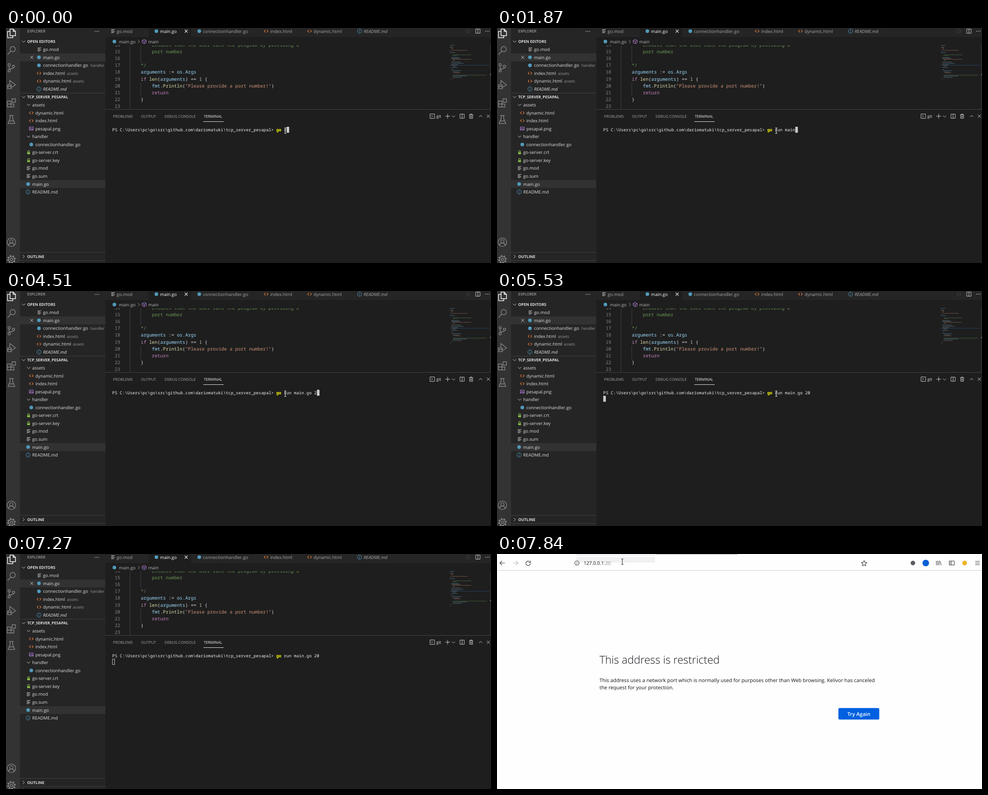
An HTML page for the animation above (8 s loop, 1074 by 521 pixels).

```html
<!DOCTYPE html>
<html lang="en">
<head>
<meta charset="utf-8">
<title>Run a TCP server</title>
<style>
html, body { margin: 0; width: 100%; height: 100%; overflow: hidden; background: #1e1e1e; }
svg { display: block; width: 100%; height: 100%; }
text { font-family: "Open Sans", "Noto Sans", sans-serif; white-space: pre; text-rendering: geometricPrecision; }
.mono { font-family: "Noto Sans Mono", "DejaVu Sans Mono", monospace; font-weight: 500; }
</style>
</head>
<body>
<svg id="stage" viewBox="0 0 1074 521" xmlns="http://www.w3.org/2000/svg"></svg>
<script>
const LOOP = 8000;
const TERM = { x: 235.3, y: 229, step: 5.595, size: 9.325 };
const CODE_SIZE = 10.25;
const PROMPT = String.raw`PS C:\Users\pc\go\src\github.com\dariomatuki\tcp_server_pesapal> `;
const COMMAND = 'go run main.go 20';

const SHAPES = {
  lines: 'M-4-3.5h8M-4-1.2h5.5M-4 1.2h8M-4 3.5h5.5',
  html: 'M-1.4-2.8L-4.2 0L-1.4 2.8M1.4-2.8L4.2 0L1.4 2.8',
  info: 'M-4.7 0a4.7 4.7 0 1 0 9.4 0a4.7 4.7 0 1 0-9.4 0M0-2.6v1.2M0-.4v3.2',
  lock: 'M-2-.5v-1.4a2 2 0 0 1 4 0v1.4M-3.1 .5h6.2M-3.1 1.5h6.2M-3.1 2.5h6.2M-3.1 3.5h6.2',
  image: 'M-4.2-3.4h8.4v6.8h-8.4zM-4 2.4l3-3 2 2 1-1 2 2',
  close: 'M-3.3-3.3L3.3 3.3M3.3-3.3L-3.3 3.3',
  down: 'M-3.6-1.8L0 1.8L3.6-1.8',
  up: 'M-3.6 1.8L0-1.8L3.6 1.8',
  right: 'M-1.8-3.6L1.8 0L-1.8 3.6',
  cube: 'M0-4.8L4.5-2.5v5L0 4.8L-4.5 2.5v-5zM-4.5-2.5L0 0L4.5-2.5M0 0v4.8',
  split: 'M-4.8-4.6h9.6v9.2h-9.6zM0-4.6v9.2',
  dots: 'M-4.5 0h1.6M-.8 0h1.6M2.9 0h1.6',
  plus: 'M-5.2 0h10.4M0-5.2v10.4',
  trash: 'M-4.4-3.2h8.8M-1.6-3.2v-1.6h3.2v1.6M-3.2-3.2v8h6.4v-8M-1-1v4M1-1v4',
  shell: 'M-5-5h10v10h-10zM-2-2.4L.6 0L-2 2.4',
  compare: 'M-3-4v6a2 2 0 0 0 2 2h2M3 4v-6a2 2 0 0 0-2-2h-2',
  files: 'M-3-9.5h7l5 5v9.5h-12zM-3-4.5h-5.5v14h11.5v-4.5M4-9.5v5h5',
  search: 'M-3-3.2a5.8 5.8 0 1 0 11.6 0a5.8 5.8 0 1 0-11.6 0M-1.3 1L-8.5 9',
  branch: 'M-7.5-6.5a2.6 2.6 0 1 0 5.2 0a2.6 2.6 0 1 0-5.2 0M-7.5 6.7a2.6 2.6 0 1 0 5.2 0a2.6 2.6 0 1 0-5.2 0M2-3a2.6 2.6 0 1 0 5.2 0a2.6 2.6 0 1 0-5.2 0M-4.9-3.9v8M4.6-.4c0 4-7 1.5-9 4',
  debug: 'M-3.5-2v-7.5L9 0L1 5.5M-8 2.5a3.6 3.6 0 0 1 7.2 0v2.8a3.6 3.6 0 0 1-7.2 0zM-8 3h7.2M-9.8 0l2 1.4M1-0l-2 1.4M-10 4.5h2M-.8 4.5h2M-9.8 9l2-1.6M1 9l-2-1.6',
  blocks: 'M-9-4h8v13h-8zM-9 2.5h14.5v6.5h-14.5M-1 2.5v6.5M1.5-9h7.5v7.5h-7.5z',
  beaker: 'M-4.5-9h9M-2.7-9v6.5L-7.5 8.5h15L2.7-2.5V-9M-5 3h10',
  account: 'M-9.4 0a9.4 9.4 0 1 0 18.8 0a9.4 9.4 0 1 0-18.8 0M-3.6-2a3.6 3.6 0 1 0 7.2 0a3.6 3.6 0 1 0-7.2 0M-6.2 7c1-7 11.4-7 12.4 0',
  hub: 'M-2.6 0a2.6 2.6 0 1 0 5.2 0a2.6 2.6 0 1 0-5.2 0M-6.4 0a6.4 6.4 0 1 0 12.8 0a6.4 6.4 0 1 0-12.8 0',
  teeth: 'M-8.2 0a8.2 8.2 0 1 0 16.4 0a8.2 8.2 0 1 0-16.4 0',
  back: 'M5.5 0h-11M-1-4.5L-5.5 0L-1 4.5',
  forward: 'M-5.5 0h11M1-4.5L5.5 0L1 4.5',
  reload: 'M3.6-3.4a5 5 0 1 0 1.4 3.4M5-5.6v4h-4',
  star: 'M0-6l1.8 3.9 4.2.5-3.1 2.9.8 4.2-3.7-2.1-3.7 2.1.8-4.2-3.1-2.9 4.2-.5z',
  books: 'M-5-5v10M-2-5v10M1-5v10M3-4.6l2.6 9.4',
  sidebar: 'M-5.5-4.5h11v9h-11zM-1-4.5v9M-4-2h1.6M-4 0h1.6M-4 2h1.6',
  menu: 'M-5-3.8h10M-5 0h10M-5 3.8h10',
  beam: 'M-2.5-6h5M0-6v12M-2.5 6h5'
};

const rect = (x, y, w, h, fill, more = '') =>
  `<rect x="${x}" y="${y}" width="${w}" height="${h}" fill="${fill}" ${more}/>`;
const dot = (x, y, r, fill) => `<circle cx="${x}" cy="${y}" r="${r}" fill="${fill}"/>`;
const icon = (name, x, y, color, width = 1, more = '') =>
  `<path transform="translate(${x} ${y})" d="${SHAPES[name]}" fill="none" stroke="${color}" stroke-width="${width}" ${more}/>`;
const text = (x, y, size, fill, str, more = '') =>
  `<text x="${x}" y="${y}" font-size="${size}" fill="${fill}" ${more}>${str}</text>`;
const spans = runs => runs.map(([str, fill]) => `<tspan fill="${fill}">${str}</tspan>`).join('');

const BLUE = '#519aba', ORANGE = '#e37933', GREEN = '#8dc149', GREY = '#d0d0d0';
const LABEL = '#dedede', FAINT = '#a6a6a6', BAR = '#252526', BACK = '#1e1e1e';
const FILE_ICONS = {
  go: (x, y) => dot(x, y, 4, BLUE),
  list: (x, y) => icon('lines', x, y, GREY),
  html: (x, y) => icon('html', x, y, ORANGE, 1.2),
  info: (x, y) => icon('info', x, y, BLUE),
  lock: (x, y) => icon('lock', x, y, GREEN, 1.2),
  image: (x, y) => icon('image', x, y, '#a074c4', 1.2),
  folder: (x, y) => icon('down', x, y, GREY)
};

function activityBar() {
  const items = [['search', 50], ['branch', 88], ['debug', 126], ['blocks', 166], ['beaker', 203], ['account', 475], ['hub', 513]];
  return rect(0, 0, 31, 521, '#333') + icon('files', 12, 12, '#fff', 1.5) +
    items.map(([name, y]) => icon(name, 12, y, '#8a8a8a', 1.4)).join('') +
    icon('teeth', 12, 513, '#8a8a8a', 2.6, 'stroke-dasharray="3.2 3.24"');
}

function sideBar() {
  const rowY = i => 30 + 17.55 * i;
  // row, icon, icon x, label x, label, note x, note
  const rows = [
    [1, 'list', 74, 82, 'go.mod'],
    [2, 'go', 73, 82, 'main.go'],
    [3, 'go', 73, 82, 'connectionhandler.go', 187, 'handler'],
    [4, 'html', 73, 82, 'index.html', 135, 'assets'],
    [5, 'html', 73, 82, 'dynamic.html', 148, 'assets'],
    [6, 'info', 73, 82, 'README.md'],
    [8, 'folder', 50, 58, 'assets'],
    [9, 'html', 56, 65, 'dynamic.html'],
    [10, 'html', 56, 65, 'index.html'],
    [11, 'image', 56, 65, 'pesapal.png'],
    [12, 'folder', 50, 58, 'handler'],
    [13, 'go', 56, 65, 'connectionhandler.go'],
    [14, 'lock', 50, 58, 'go-server.crt'],
    [15, 'lock', 50, 58, 'go-server.key'],
    [16, 'list', 50, 58, 'go.mod'],
    [17, 'list', 50, 58, 'go.sum'],
    [18, 'go', 49, 58, 'main.go'],
    [19, 'info', 49, 58, 'README.md']
  ];
  const head = (y, name, shape) =>
    icon(shape, 39, y, GREY) + text(47, y + 3, 8.6, LABEL, name, 'font-weight="700"');
  let out = rect(31, 0, 189, 521, BAR) +
    [2, 18].map(i => rect(31, rowY(i) - 8.7, 189, 17.5, '#323233')).join('') +
    [144, 497, 515].map(y => rect(31, y, 189, 1, '#414142')).join('') +
    text(47, 10.3, 8.4, '#c4c4c4', 'EXPLORER') + icon('dots', 201, 7.5, GREY, 1.6) +
    head(30, 'OPEN EDITORS', 'down') + head(153, 'TCP_SERVER_PESAPAL', 'down') + head(506.5, 'OUTLINE', 'right') +
    icon('right', 39, 523.5, GREY) + icon('close', 57, rowY(2), GREY);
  for (const [i, kind, ix, x, label, nx, note] of rows) {
    const y = rowY(i);
    out += FILE_ICONS[kind](ix, y) + text(x, y + 3.6, 9.8, LABEL, label, i === 6 ? 'font-style="italic"' : '');
    if (note) out += text(nx, y + 3.6, 8.6, '#999', note);
  }
  return out;
}

function tabs() {
  const list = [
    ['list', 237, 245, 'go.mod'],
    ['go', 333, 341, 'main.go'],
    ['go', 428, 436, 'connectionhandler.go'],
    ['html', 576, 585, 'index.html'],
    ['html', 672, 681, 'dynamic.html'],
    ['info', 783, 792, 'README.md']
  ];
  return rect(220, 0, 854, 20, BAR) + rect(316, 0, 94, 20, BACK) +
    list.map(([kind, ix, x, label]) => FILE_ICONS[kind](ix, 7) +
      text(x, 10.7, 9.85, label === 'main.go' ? '#fff' : FAINT, label, kind === 'info' ? 'font-style="italic"' : '')
    ).join('') + icon('close', 399, 7, '#fff', 1.1) + icon('compare', 1023, 7, '#484848') +
    icon('split', 1045, 7, GREY) + icon('dots', 1066, 7, GREY, 1.6);
}

function editor() {
  const note = '#6a9955', name = '#9cdcfe', plain = '#dcdcdc', word = '#c586c0', fn = '#dcdcaa';
  const lines = [
    [14, 323, ['Ensures that the user runs the program by providing a', note]],
    [15, 323, ['port number', note]],
    [17, 298.5, ['*/', note]],
    [18, 298.5, ['arguments', name], [' := ', plain], ['os.Args', name]],
    [19, 298.5, ['if ', word], ['len', fn], ['(', plain], ['arguments', name], [') == ', plain], ['1', '#b5cea8'], [' {', plain]],
    [20, 323, ['fmt', name], ['.', plain], ['Println', fn], ['(', plain], ['"Please provide a port number!"', '#ce9178'], [')', plain]],
    [21, 323, ['return', word]],
    [22, 298.5, ['}', plain]]
  ];
  const base = n => 55.8 + (n - 15) * 15.18;
  let out = '<clipPath id="code"><rect x="220" y="38.5" width="854" height="142"/></clipPath><g clip-path="url(#code)">' +
    rect(274, 38, 1, 142, '#404040') + rect(298, 38, 1, 38, '#404040') + rect(298, 121, 1, 30, '#404040');
  for (let n = 14; n <= 23; n++)
    out += text(253, base(n), CODE_SIZE, '#858585', n, 'class="mono" text-anchor="end"');
  for (const [n, x, ...runs] of lines)
    out += text(x, base(n), CODE_SIZE, plain, spans(runs), 'class="mono"');
  return out + '</g>' + minimap() +
    dot(240, 30, 4, BLUE) + text(250, 33.5, 9.8, '#b4b4b4', 'main.go') + icon('right', 294, 30, '#b4b4b4', .9) +
    icon('cube', 306, 30, '#b180d7') + text(315, 33.5, 9.8, '#b4b4b4', 'main');
}

function minimap() {
  const tone = { b: '#4b7f9c', o: '#8a6250', g: '#4d6f40', w: '#777' };
  const marks = [
    [38, 0, 10, 'b'], [42, 0, 7, 'w'], [44, 3, 4, 'o'], [46, 3, 3, 'o'], [49, 3, 36, 'o'], [51, 0, 2, 'w'],
    [54, 0, 11, 'b'], [59, 6, 42, 'g'], [61, 6, 10, 'g'], [65, 3, 17, 'b'], [67, 3, 20, 'w'], [69, 6, 41, 'o'],
    [71, 6, 5, 'w'], [75, 3, 21, 'w'], [78, 3, 27, 'b'], [81, 3, 15, 'w'], [84, 6, 7, 'w'], [87, 3, 13, 'b'],
    [92, 3, 4, 'w'], [94, 6, 19, 'b'], [97, 6, 14, 'w'], [99, 9, 14, 'o'], [104, 6, 76, 'g'],
    [106, 6, 32, 'b'], [109, 6, 20, 'w'], [112, 3, 2, 'w'], [115, 0, 2, 'w']
  ];
  return rect(983, 82, 88, 1, '#24405f') +
    marks.map(([y, x, w, c]) => rect(983 + x, y, w, 1, tone[c], 'opacity=".75"')).join('') +
    rect(1072, 38, 1, 142, '#3c3c3c') + rect(1072, 102, 2, 2, '#888');
}

function panel() {
  const names = [[237, 'PROBLEMS'], [299, 'OUTPUT'], [351, 'DEBUG CONSOLE'], [438, 'TERMINAL']];
  const tools = [['shell', 944], ['plus', 978], ['split', 1010], ['trash', 1030], ['up', 1051], ['close', 1068]];
  return rect(220, 180, 854, 1, '#454545') +
    names.map(([x, s]) => text(x, 198.6, 8.45, s === 'TERMINAL' ? '#f2f2f2' : FAINT, s)).join('') +
    rect(437, 207, 45, 1, '#e7e7e7') +
    tools.map(([s, x]) => icon(s, x, 195.5, GREY)).join('') +
    text(953, 199, 9.2, LABEL, 'git') + icon('down', 991, 196, GREY, .9) +
    text(TERM.x, TERM.y, TERM.size, '#ececec',
      PROMPT + '<tspan fill="#ff0" font-weight="600">go</tspan><tspan id="typed"></tspan>', 'class="mono"') +
    `<g id="caret">${rect(0, 0, 5.7, 13.1, '#ccc')}<rect id="hole" x="1" y="1" width="3.7" height="11.1" fill="${BACK}"/></g>` +
    `<g id="beam">${icon('beam', 0, 0, '#e8e8e8')}</g>`;
}

function browser() {
  const ink = '#3b3a42', dark = '#15141a';
  return rect(0, 0, 1074, 521, '#fefefe') + rect(0, 36, 1074, 1, '#ccccce') +
    rect(175, 0, 177, 1, '#d8d8da') + rect(352, 0, 181, 1, '#b9b9bb') + rect(353, 1, 179, 1, '#e4e4e6') +
    `<g id="hover">${rect(175, 0, 175, 4, '#f0f0f2')}${rect(175, 6.5, 175, 12.5, '#f0f0f2')}</g>` +
    icon('back', 12, 20, ink, 1.2) + icon('forward', 41, 20, '#b8b8bb', 1.2) + icon('reload', 69, 20.5, ink, 1.2) +
    icon('info', 177, 20, ink, 1.1) +
    text(192, 24.4, 10.6, dark, '127.0.0.1<tspan fill="#85858c">:20</tspan>') +
    icon('star', 813, 20.5, ink, 1.1) + dot(921, 20, 5, '#5b5b66') + dot(949.5, 20, 7.3, '#0a5fd6') +
    icon('books', 978, 20, ink, 1.1) + icon('sidebar', 1007, 20, ink, 1.1) +
    dot(1035.5, 20, 5.2, '#f0b429') + icon('menu', 1064, 20, ink, 1.1) +
    text(227, 243, 23.9, dark, 'This address is restricted', 'font-weight="300"') +
    text(227, 284, 11.18, dark, 'This address uses a network port which is normally used for purposes other than Web browsing. Kelivor has canceled') +
    text(227, 300, 11.18, dark, 'the request for your protection.') +
    rect(756, 341.5, 90.5, 25.5, '#0060df', 'rx="3"') +
    text(801.3, 358.8, 11.4, '#fff', 'Try Again', 'font-weight="600" text-anchor="middle"') +
    '<path id="arrow" d="M0 0V13L3 10.3L5.2 15.3L7.3 14.4L5.1 9.5H9.2Z" fill="#fff" stroke="#222" stroke-width=".9"/>' +
    `<g id="webBeam">${icon('beam', 0, 0, '#222')}</g>`;
}

const $ = id => document.getElementById(id);
$('stage').innerHTML =
  `<g id="ide">${sideBar()}${rect(220, 0, 854, 521, BACK)}${activityBar()}${tabs()}${editor()}${panel()}</g>` +
  `<g id="web">${browser()}</g>`;

// [start ms, value...]
const KEYS = [[0, 4], [150, 5], [450, 6], [580, 7], [1170, 8], [1320, 9], [1470, 10], [1870, 11], [2490, 12],
  [3210, 13], [3490, 14], [3770, 15], [4510, 16], [4660, 17]];
const POINTER = [[0, 'beam', 618.5, 227.5], [5960, 'beam', 622.5, 227.5], [6110, 'beam', 1057, 455.5], [6390, ''],
  [7410, 'arrow', 268, 3], [7540, 'arrow', 273.5, 4.5], [7690, 'webBeam', 277.5, 14], [7840, 'webBeam', 277.5, 17]];
const ENTER = 5530, BLUR = 7270, SWITCH = 7410, HOVER = 7540;

const at = (table, t) => table.findLast(row => row[0] <= t);
const show = (id, on) => $(id).setAttribute('visibility', on ? 'inherit' : 'hidden');
const move = (id, x, y) => $(id).setAttribute('transform', `translate(${x} ${y})`);

function draw(t) {
  const count = at(KEYS, t)[1];
  $('typed').textContent = COMMAND.slice(2, count);
  if (t < ENTER) move('caret', TERM.x + TERM.step * (PROMPT.length + count), 219);
  else move('caret', TERM.x, 232.4);
  show('hole', t >= BLUR);
  show('ide', t < SWITCH);
  show('web', t >= SWITCH);
  show('hover', t >= HOVER);
  const [, kind, x, y] = at(POINTER, t);
  for (const id of ['beam', 'arrow', 'webBeam']) show(id, id === kind);
  if (kind) move(kind, x, y);
}

function tick() {
  draw(performance.now() % LOOP);
  requestAnimationFrame(tick);
}
tick();
</script>
</body>
</html>
```
